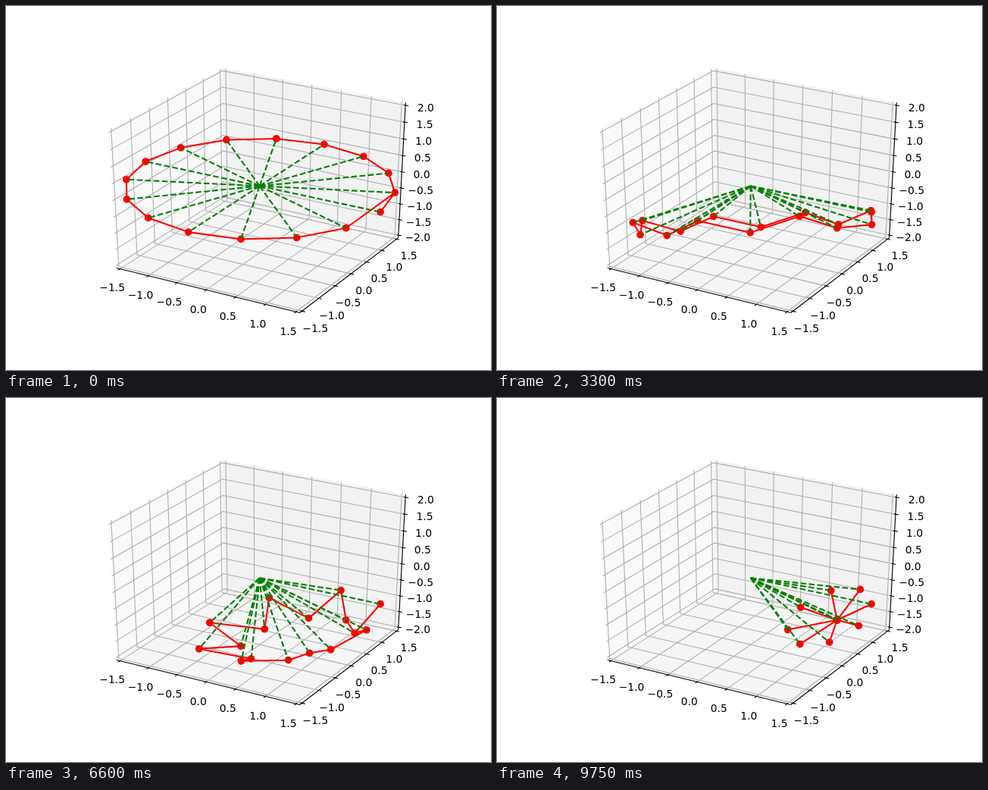
These frames come from a looping animation (640 by 480 pixels, 9.9 s). An HTML page with a canvas:

```html
<!DOCTYPE html>
<html lang="en">
<head>
<meta charset="utf-8">
<title>Folding star</title>
<style>
html, body { margin: 0; width: 100%; height: 100%; overflow: hidden; background: #fff; }
canvas { display: block; }
</style>
</head>
<body>
<canvas id="stage" width="640" height="480"></canvas>
<script>
const ctx = document.getElementById('stage').getContext('2d');
const { sin, cos, PI, sqrt, acos, atan2, min } = Math;
const RAD = PI / 180, STEP = PI / 8, RADIUS = 2;
const FRAME = 150, COUNT = 66;
const LINE = 100 / 72;

// Perspective camera: azimuth -60, elevation 30, distance 10.
function project([x, y, z]) {
  const a = x / 3, b = y / 3, c = z / 4, h = sqrt(3) / 2;
  const right = h * a + b / 2;
  const up = -a / 4 + h / 2 * b + h * c;
  const depth = 10 - (h / 2 * a - 0.75 * b + c / 2);
  return [334.7 + 2681 * right / depth, 237.4 - 1997.8 * up / depth];
}

function trace(points) {
  ctx.beginPath();
  points.forEach(p => ctx.lineTo(...project(p)));
}

function stroke(points, color, width) {
  trace(points);
  ctx.strokeStyle = color;
  ctx.lineWidth = width;
  ctx.stroke();
}

function pane(points, color) {
  trace(points);
  ctx.closePath();
  ctx.fillStyle = color;
  ctx.fill();
}

const E = 1.5625, Z = 2.08333;
const thin = 0.8 * LINE;

function ticks(limit) {
  const list = [];
  for (let v = -limit; v <= limit; v += 0.5) list.push(v);
  return list;
}

function label(value, at) {
  const [x, y] = project(at);
  ctx.fillText((value < 0 ? '\u2212' : '') + Math.abs(value).toFixed(1), x, y + 10.6);
}

function drawAxes() {
  pane([[-E, -E, -Z], [-E, E, -Z], [-E, E, Z], [-E, -E, Z]], '#f9f9f9');
  pane([[-E, E, -Z], [E, E, -Z], [E, E, Z], [-E, E, Z]], '#f2f2f2');
  pane([[-E, -E, -Z], [E, -E, -Z], [E, E, -Z], [-E, E, -Z]], '#f5f5f5');

  const grid = points => stroke(points, '#b0b0b0', thin);
  for (const v of ticks(1.5)) {
    grid([[v, -E, -Z], [v, E, -Z], [v, E, Z]]);
    grid([[E, v, -Z], [-E, v, -Z], [-E, v, Z]]);
  }
  for (const v of ticks(2)) grid([[-E, -E, v], [-E, E, v], [E, E, v]]);

  const dark = points => stroke(points, '#000', thin);
  dark([[-E, -E, -Z], [E, -E, -Z]]);
  dark([[E, -E, -Z], [E, E, -Z]]);
  dark([[E, E, -Z], [E, E, Z]]);

  ctx.fillStyle = '#000';
  ctx.font = '13.89px "DejaVu Sans", sans-serif';
  ctx.textAlign = 'center';
  const inner = E - 0.025, outer = E + 0.05, far = E + 0.2214, low = -Z - 0.2952;
  for (const v of ticks(1.5)) {
    dark([[v, -inner, -Z], [v, -outer, -Z]]);
    dark([[inner, v, -Z], [outer, v, -Z]]);
    label(v, [v, -far, low]);
    label(v, [far, v, low]);
  }
  for (const v of ticks(2)) {
    dark([[inner, E, v], [outer, E, v]]);
    label(v, [far, far, v]);
  }
}

// Fold angle at the tips, in degrees, by step.
const foldKeys = [[0, 0], [8, 22.9], [16, 45.7], [28, 81], [44, 128.8], [57, 167], [65, 180]];

function foldAt(step) {
  const i = foldKeys.findIndex(k => k[0] >= step);
  if (i < 1) return 0;
  const [s0, a0] = foldKeys[i - 1], [s1, a1] = foldKeys[i];
  return (a0 + (a1 - a0) * (step - s0) / (s1 - s0)) * RAD;
}

const mix = (...terms) =>
  [0, 1, 2].map(i => terms.reduce((sum, [k, vec]) => sum + k * vec[i], 0));

// Closed spherical linkage of 16 equal arcs with one panel held still.
function vertices(fold) {
  const s = sin(fold / 2), c = cos(fold / 2) * cos(STEP);
  const half = atan2(s, c) - acos(min(1, cos(STEP) / sqrt(s * s + c * c)));
  const hubAngle = PI / 2 - fold / 2, tipAngle = PI / 2 - half;
  const turn = 1.5 * PI + half;

  const hub = [cos(STEP), -sin(STEP), 0];
  const side = [-sin(STEP), -cos(STEP), 0];
  const up = [0, 0, 1];
  const lean = mix([cos(turn), side], [sin(turn), up]);
  const axis = mix([cos(hubAngle), hub], [sin(hubAngle), lean]);
  const u = mix([sin(hubAngle), hub], [-cos(hubAngle), lean]);
  const v = mix([sin(turn), side], [-cos(turn), up]);

  return Array.from({ length: 16 }, (_, k) => {
    const tilt = k % 2 ? hubAngle : tipAngle, a = (k + 1) * STEP;
    return mix(
      [RADIUS * cos(tilt), axis],
      [RADIUS * sin(tilt) * cos(a), u],
      [RADIUS * sin(tilt) * sin(a), v]
    );
  });
}

function drawStar(points) {
  ctx.lineJoin = 'round';
  stroke([...points, points[1]], '#f00', 1.5 * LINE);
  ctx.fillStyle = '#f00';
  for (const p of points) {
    ctx.beginPath();
    ctx.arc(...project(p), 3.5 * LINE, 0, 2 * PI);
    ctx.fill();
  }
  ctx.setLineDash([5.55 * LINE, 2.4 * LINE]);
  for (const p of points) stroke([[0, 0, 0], p], '#008000', 1.5 * LINE);
  ctx.setLineDash([]);
}

function render(time) {
  const step = Math.floor(time / FRAME) % COUNT;
  ctx.fillStyle = '#fff';
  ctx.fillRect(0, 0, 640, 480);
  drawAxes();
  drawStar(vertices(foldAt(step)));
}

const start = performance.now();
function tick() {
  render(performance.now() - start);
  requestAnimationFrame(tick);
}
tick();
</script>
</body>
</html>
```
